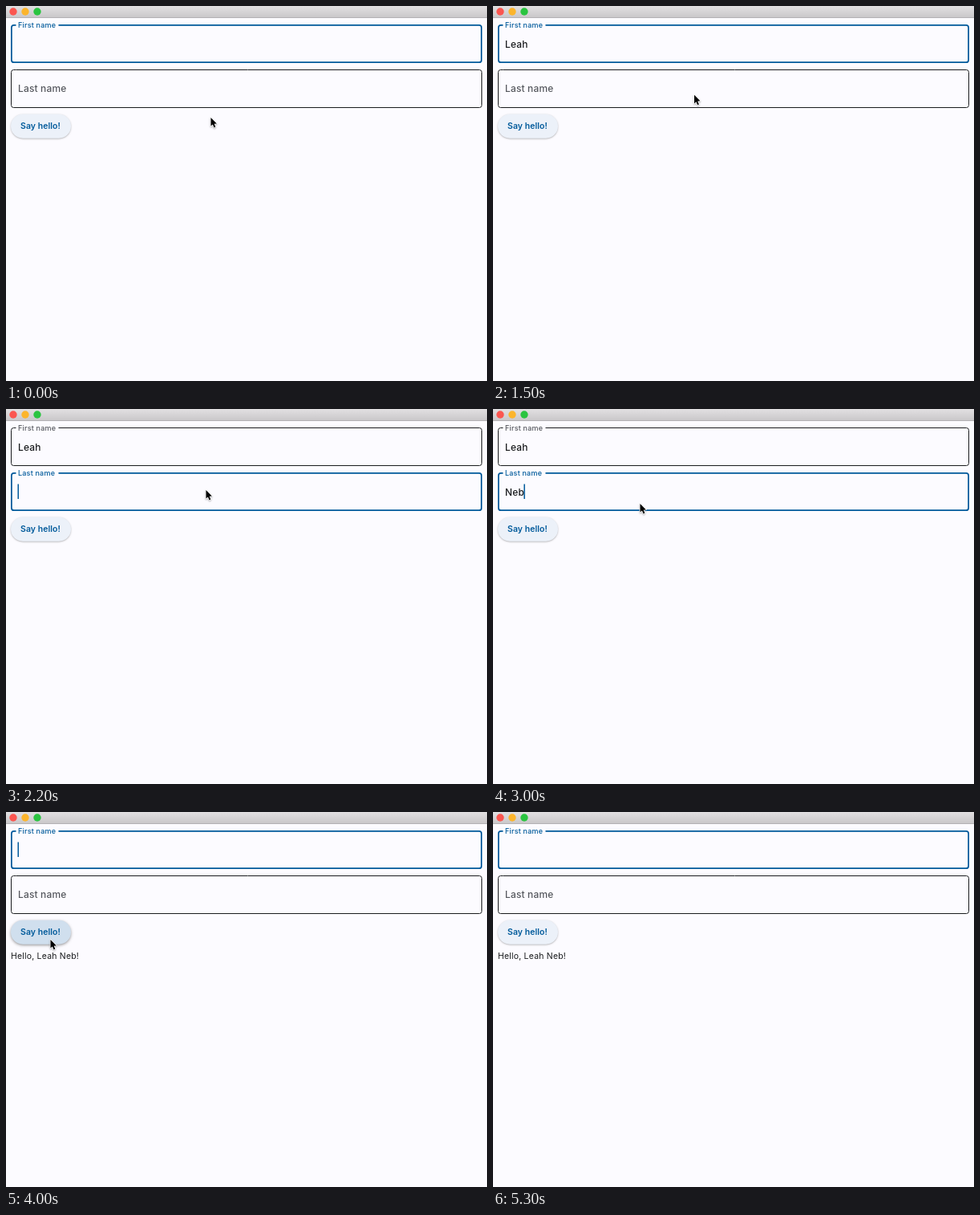
Recreate the animation shown at these times as an HTML page with a canvas. Size 600x467 px, loop 5400 ms.

```html
<!DOCTYPE html>
<html lang="en">
<head>
<meta charset="utf-8">
<title>Say hello</title>
<style>
html, body { margin: 0; width: 100%; height: 100%; overflow: hidden; background: #fcfbff; }
canvas { display: block; width: 600px; height: 467px; }
</style>
</head>
<body>
<canvas id="stage"></canvas>
<script>
const W = 600, H = 467, LOOP = 5400, STEP = 100;
const FIRST = 'Leah', LAST = 'Neb';
const BG = '#fcfbff';
const INK = [26, 28, 30], GREY = [86, 88, 94], BLUE = [0, 90, 155];
const FONT = 'Inter, Roboto, sans-serif';

const canvas = document.getElementById('stage');
const ctx = canvas.getContext('2d');
const dpr = window.devicePixelRatio || 1;
canvas.width = W * dpr;
canvas.height = H * dpr;

const clamp = v => Math.max(0, Math.min(1, v));
const mix = (a, b, k) => a + (b - a) * k;
const ramp = (t, from, to) => clamp((t - from) / (to - from));
const ease = k => k * k * (3 - 2 * k);
const rgb = c => `rgb(${c.map(Math.round).join(',')})`;
const blend = (a, b, k) => rgb(a.map((v, i) => mix(v, b[i], k)));

// times at which each letter appears
const FIRST_KEYS = [600, 700, 900, 1000];
const LAST_KEYS = [2300, 2500, 2600];
const CLEAR = 3700;
const CARET = [[100, 500], [600, 1500], [2000, 3100], [3700, 4100], [4600, 5100]];

// pointer tip: time, x, y
const PATH = [
  [0, 255, 139], [1100, 255, 139], [1700, 249, 101], [2900, 249, 101],
  [3000, 183, 118], [3300, 55, 159], [4100, 55, 159], [4600, 259, 137]
];
const POINTER_GONE = 4700;

function typed(word, keys, t) {
  return t >= CLEAR ? '' : word.slice(0, keys.filter(k => t >= k).length);
}

function pointerAt(t) {
  let i = 0;
  while (i < PATH.length - 2 && t > PATH[i + 1][0]) i++;
  const [t0, x0, y0] = PATH[i], [t1, x1, y1] = PATH[i + 1];
  const k = ramp(t, t0, t1), e = t1 - t0 > 400 ? ease(k) : k;
  return [mix(x0, x1, e), mix(y0, y1, e)];
}

function text(str, x, y, size, weight, color, spacing) {
  ctx.font = `${weight} ${size}px ${FONT}`;
  ctx.letterSpacing = spacing + 'px';
  ctx.fillStyle = color;
  ctx.fillText(str, x, y);
  return ctx.measureText(str).width;
}

function titleBar() {
  const g = ctx.createLinearGradient(0, 0, 0, 14);
  g.addColorStop(0, '#e2e0e2');
  g.addColorStop(1, '#cac8ca');
  ctx.fillStyle = g;
  ctx.fillRect(0, 0, W, 14);
  ctx.fillStyle = '#b3b1b4';
  ctx.fillRect(0, 14, W, 1);
  ['#fb5650', '#fcb52c', '#2ac440'].forEach((c, i) => {
    ctx.beginPath();
    ctx.arc(9 + 15 * i, 7, 4.7, 0, Math.PI * 2);
    ctx.fillStyle = c;
    ctx.fill();
  });
}

function outline(y, focus, float) {
  const w = mix(1, 1.75, focus), p = w / 2, r = 3;
  const l = 6 + p, rt = 594 - p, top = y + p, bot = y + 48 - p;
  ctx.beginPath();
  ctx.moveTo(12.5 + 53 * float, top);
  ctx.arcTo(rt, top, rt, bot, r);
  ctx.arcTo(rt, bot, l, bot, r);
  ctx.arcTo(l, bot, l, top, r);
  ctx.arcTo(l, top, rt, top, r);
  ctx.lineTo(12.5, top);
  ctx.lineWidth = w;
  ctx.strokeStyle = blend(INK, BLUE, focus);
  ctx.stroke();
}

function field(y, label, value, focus, float, caret) {
  outline(y, focus, float);
  text(label, 15, mix(y + 28, y + 3.6, float), mix(12, 9, float), 500,
    blend(GREY, BLUE, focus), mix(0.15, 0.2, float));
  const w = value ? text(value, 15, y + 29, 12, 500, rgb(INK), 0.13) : 0;
  if (caret) {
    ctx.fillStyle = rgb(BLUE);
    ctx.fillRect(14.5 + w, y + 14.5, 1.5, 18.5);
  }
}

function button(hover) {
  ctx.save();
  ctx.shadowColor = `rgba(0,0,0,${mix(0.3, 0.4, hover)})`;
  ctx.shadowBlur = mix(2, 3.5, hover) * dpr;
  ctx.shadowOffsetY = mix(0.8, 1.3, hover) * dpr;
  ctx.fillStyle = blend([236, 241, 249], [208, 223, 238], hover);
  ctx.beginPath();
  ctx.roundRect(6, 134.7, 75, 30, 15);
  ctx.fill();
  ctx.restore();
  text('Say hello!', 18, 153.3, 10.5, 600, rgb(BLUE), 0.05);
}

function pointer([x, y]) {
  const pts = [[0, 0], [0, 10.6], [2.4, 8.4], [4.1, 12.4], [5.9, 11.6], [4.2, 7.7], [7.4, 7.5]];
  ctx.save();
  ctx.translate(x + 0.5, y);
  ctx.beginPath();
  pts.forEach(([px, py]) => ctx.lineTo(px, py));
  ctx.closePath();
  ctx.lineJoin = 'round';
  ctx.lineWidth = 1.6;
  ctx.strokeStyle = '#fff';
  ctx.shadowColor = 'rgba(0,0,0,0.3)';
  ctx.shadowBlur = 2 * dpr;
  ctx.shadowOffsetY = dpr;
  ctx.stroke();
  ctx.shadowColor = 'transparent';
  ctx.fillStyle = '#000';
  ctx.fill();
  ctx.restore();
}

function draw(t) {
  ctx.setTransform(dpr, 0, 0, dpr, 0, 0);
  ctx.fillStyle = BG;
  ctx.fillRect(0, 0, W, H);
  titleBar();

  const caret = CARET.some(([a, b]) => t >= a && t < b);
  const onLast = t >= 1900 && t < 3500;
  const focus1 = t < 3000 ? 1 - ramp(t, 1800, 2000) : ramp(t, 3600, 3800);
  const focus2 = t < 3000 ? ramp(t, 1900, 2100) : 1 - ramp(t, 3400, 3600);
  const float2 = t < 3000 ? ramp(t, 1900, 2100) : 1 - ramp(t, 3650, 3850);
  field(23, 'First name', typed(FIRST, FIRST_KEYS, t), focus1, 1, caret && !onLast);
  field(79, 'Last name', typed(LAST, LAST_KEYS, t), focus2, ease(float2), caret && onLast);

  button(ramp(t, 3200, 3400) - ramp(t, 4200, 4400));
  if (t >= CLEAR) text(`Hello, ${FIRST} ${LAST}!`, 6, 183.4, 10.5, 400, rgb(INK), 0.19);
  if (t < POINTER_GONE) pointer(pointerAt(t));
}

function tick() {
  const t = performance.now() % LOOP;
  draw(Math.floor(t / STEP) * STEP);
  requestAnimationFrame(tick);
}
tick();
</script>
</body>
</html>
```
